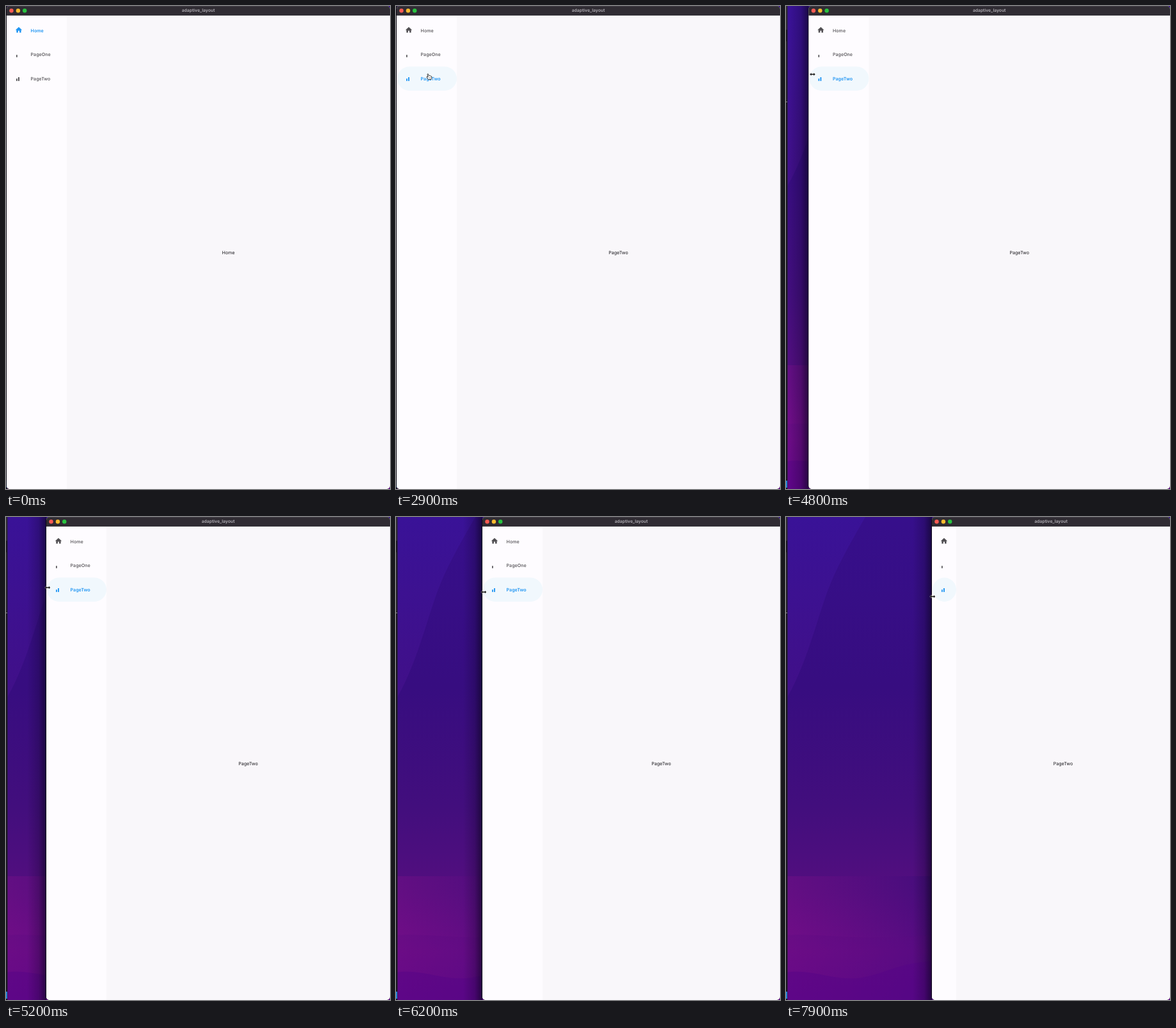
Write an HTML page that moves like this. It is 600 px wide and 753 px high and loops after 8000 ms.

```html
<!DOCTYPE html>
<html lang="en">
<head>
<meta charset="utf-8">
<title>adaptive_layout</title>
<style>
html, body { margin: 0; width: 100%; height: 100%; overflow: hidden; background: #17151c; }
svg { display: block; width: 600px; height: 753px; }
text { font-family: Inter, Roboto, sans-serif; text-rendering: geometricPrecision; }
.label { font-size: 7.1px; font-weight: 500; }
.title { font-size: 6.75px; font-weight: 600; fill: #b4b1b7; text-anchor: middle; }
.body { font-size: 7.1px; fill: #17161a; text-anchor: middle; }
</style>
</head>
<body>
<svg viewBox="0 0 600 753" xmlns="http://www.w3.org/2000/svg">
  <defs>
    <linearGradient id="sky" x2="0" y2="1">
      <stop offset="0" stop-color="#360f8b"/>
      <stop offset=".35" stop-color="#370d80"/>
      <stop offset=".6" stop-color="#420e7d"/>
      <stop offset=".78" stop-color="#540e7f"/>
      <stop offset=".9" stop-color="#690c86"/>
      <stop offset="1" stop-color="#5f0589"/>
    </linearGradient>
    <linearGradient id="glow">
      <stop offset="0" stop-color="#8a0f8c" stop-opacity=".3"/>
      <stop offset="1" stop-color="#2c0a78" stop-opacity=".35"/>
    </linearGradient>
    <linearGradient id="fall" x2="0" y2="1">
      <stop offset="0" stop-color="#3a139a" stop-opacity=".8"/>
      <stop offset="1" stop-color="#43108a" stop-opacity=".8"/>
    </linearGradient>
    <linearGradient id="shade">
      <stop offset="0" stop-color="#08031a" stop-opacity="0"/>
      <stop offset=".6" stop-color="#08031a" stop-opacity=".22"/>
      <stop offset="1" stop-color="#08031a" stop-opacity=".65"/>
    </linearGradient>
    <clipPath id="frame"><rect id="frameRect" y="0" height="753" rx="5"/></clipPath>
  </defs>

  <rect width="600" height="753" fill="url(#sky)"/>
  <path d="M0 0H124C98 45 78 80 64 118C46 168 30 235 0 284Z" fill="url(#fall)"/>
  <rect y="560" width="240" height="193" fill="url(#glow)"/>
  <path d="M0 652C60 648 120 664 240 650V753H0Z" fill="#5a0a80" opacity=".3"/>
  <path d="M0 710C40 704 70 722 110 719S170 694 240 692V753H0Z" fill="#560488" opacity=".5"/>
  <rect width="2.4" height="753" fill="#1b1822"/>
  <path d="M0 0H2V37H0ZM0 55H1V148H0Z" fill="#302d35"/>
  <rect y="149" width="2" height="1" fill="#8d8a93"/>
  <rect y="740" width="2" height="11" fill="#2383d8"/>
  <rect id="shadow" y="0" width="30" height="753" fill="url(#shade)"/>
  <rect id="edge" y="0" height="753" rx="5.5" fill="#0c0912"/>

  <g clip-path="url(#frame)">
    <rect width="600" height="753" fill="#f9f7fa"/>
    <g id="win">
      <rect id="rail" y="14" height="740" fill="#fefcff"/>
      <g id="items"></g>
    </g>
    <rect width="600" height="14.5" fill="#302c33"/>
    <rect width="600" height=".8" fill="#47434b"/>
    <rect y="13.8" width="600" height=".8" fill="#1c191f"/>
    <g id="lights">
      <circle cx="7.5" cy="7.2" r="3.2" fill="#fc5b54"/>
      <circle cx="17.9" cy="7.2" r="3.2" fill="#fdbc2f"/>
      <circle cx="28.2" cy="7.2" r="3.2" fill="#28c33f"/>
    </g>
    <text id="title" class="title" y="9.4">adaptive_layout</text>
    <text id="body" class="body" y="386.8"></text>
  </g>

  <g id="hand">
    <path d="M-1.6 4.6C-2.4 3-3.6 1.8-4 .7C-4.2-.2-3.1-.4-2.5.3L-1.8 1L-2.9-3.2C-3.1-4.4-1.8-4.7-1.4-3.6L-.6-1.1C-.3-1.7.6-1.6.8-1C1.3-1.5 2.1-1.3 2.2-.6C2.8-.9 3.5-.6 3.6 0C4 1.8 3.6 3 3 4.6Z"
      fill="#fff" stroke="#222" stroke-width=".9" stroke-linejoin="round"/>
    <path d="M-.1 1.2V3M1.1 1.2V3M2.2 1.2V3" stroke="#333" stroke-width=".4"/>
  </g>
  <path id="resize" d="M-4.2 0L-1.9-2.2V-.7H1.9V-2.2L4.2 0L1.9 2.2V.7H-1.9V2.2Z"
    fill="#111" stroke="#fff" stroke-width=".8" paint-order="stroke"/>
  <path id="arrow" d="M0 0V8.4L2 6.6L3.3 9.5L4.7 8.9L3.4 6.1H6Z" fill="#111" stroke="#fff" stroke-width=".7"/>
</svg>
<script>
const LOOP = 8000, STEP = 100;
const $ = id => document.getElementById(id);
const set = (el, attrs) => { for (const k in attrs) el.setAttribute(k, attrs[k]); };
const clamp = v => Math.max(0, Math.min(1, v));
const mix = (a, b, p) => a + (b - a) * p;

const pages = ["Home", "PageOne", "PageTwo"];
const icons = [
  '<path transform="translate(12.7 31.2) scale(.52)" d="M10 20v-6h4v6h5v-8h3L12 3 2 12h3v8z"/>',
  '<rect x="15" y="76.2" width="1.7" height="3.6"/>',
  '<rect x="15" y="113.2" width="1.8" height="3.7"/><rect x="18" y="111" width="1.9" height="5.9"/>'
];
$("items").innerHTML = pages.map((name, i) => `<g>
  <rect x="1" y="${19.3 + 37.6 * i}" height="37.4" rx="18.7" fill="#f1f8fd"/>
  ${icons[i]}<text class="label" x="37.6" y="${40.6 + 37.6 * i}">${name}</text></g>`).join("");
const items = [...$("items").children];

// [time, value...]
const edgeKeys = [[4300, 1], [5200, 63], [6000, 123], [6200, 135], [7000, 181], [7900, 228], [8000, 232]];
const cursorKeys = [
  [500, -8, 140], [1100, 50, 82], [1500, 50, 82], [1800, 49, 93.5], [2200, 52, 110],
  [3100, 52, 110], [3700, 4, 101], [4000, 3, 101], [4200, 4, 101.5], [4300, 12, 102],
  [5200, 65, 110], [6200, 137, 117], [7000, 186, 121.5], [7900, 229, 124], [8000, 233, 124.5]
];

function track(keys, t) {
  if (t <= keys[0][0]) return keys[0].slice(1);
  const i = keys.findIndex(k => k[0] >= t);
  const a = keys[i - 1], b = keys[i], p = (t - a[0]) / (b[0] - a[0]);
  return a.slice(1).map((v, n) => mix(v, b[n + 1], p));
}

function tint(p) {
  const from = [82, 80, 84], to = [33, 150, 243];
  return `rgb(${from.map((v, i) => Math.round(mix(v, to[i], p)))})`;
}

function draw(t) {
  const [x] = track(edgeKeys, t);
  const [cx, cy] = track(cursorKeys, t);
  const fold = clamp((t - 7000) / 200);
  const railW = mix(94, 38, fold);
  const page = t < 1400 ? 0 : t < 2300 ? 1 : 2;
  const chosen = [1 - clamp((t - 1300) / 200), clamp((t - 1300) / 200), clamp((t - 2200) / 200)];
  chosen[1] -= chosen[2];

  set($("frameRect"), { x, width: 600 - x });
  set($("edge"), { x: x - .8, width: 601 - x });
  set($("shadow"), { x: x - 30 });
  set($("win"), { transform: `translate(${x})` });
  set($("lights"), { transform: `translate(${x})` });
  set($("rail"), { width: railW });
  set($("title"), { x: (x + 600) / 2 });
  set($("body"), { x: (x + railW + 600) / 2 });
  $("body").textContent = pages[page];

  const inside = t > 500 && cx > 0;
  const hover = inside ? Math.floor((cy - 19.3) / 37.6) : -1;
  items.forEach((g, i) => {
    set(g, { fill: tint(chosen[i]) });
    set(g.firstElementChild, { width: railW - 1, opacity: hover === i ? 1 : 0 });
    set(g.lastElementChild, { opacity: clamp(1 - fold * 1.6), "font-weight": 500 });
    g.lastElementChild.style.fontWeight = chosen[i] > .5 ? 600 : 500;
  });

  const kind = t <= 500 ? "" : t >= 3700 ? "resize" : hover >= 0 && hover < 3 ? "hand" : "arrow";
  for (const id of ["hand", "resize", "arrow"])
    set($(id), { transform: `translate(${cx} ${cy})`, visibility: id === kind ? "visible" : "hidden" });
}

const start = performance.now();
function tick() {
  const t = (performance.now() - start) % LOOP;
  draw(Math.floor(t / STEP) * STEP);
  requestAnimationFrame(tick);
}
draw(0);
tick();
</script>
</body>
</html>
```
